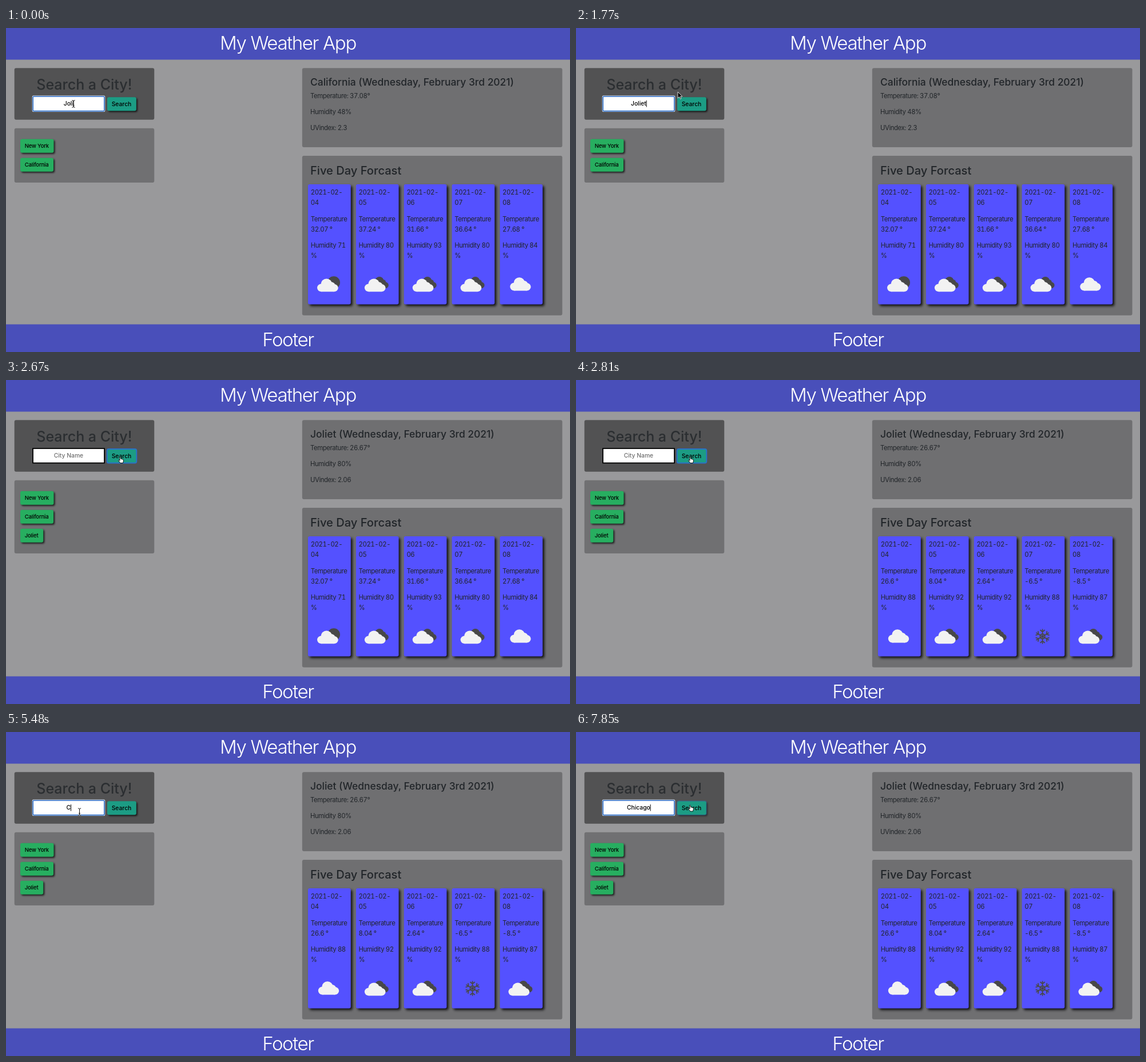
Animation of 986x568 px, one loop 8000 ms. Source, as an HTML page:

```html
<!DOCTYPE html>
<html lang="en">
<head>
<meta charset="utf-8">
<title>My Weather App</title>
<style>
  html, body { margin: 0; width: 100%; height: 100%; overflow: hidden; background: #99999b; }
  svg { display: block; width: 986px; height: 568px; }
  text { font-family: Inter, "Open Sans", sans-serif; font-optical-sizing: none; fill: #212529; white-space: pre; }
  .banner { font-size: 33px; font-weight: 300; letter-spacing: -.041em; fill: #fff; text-anchor: middle; }
  .body { font-size: 11.3px; letter-spacing: -.034em; font-variant-numeric: tabular-nums; }
  .title { font-weight: 500; }
  .field { font-size: 10.3px; font-weight: 500; text-anchor: middle; }
  .city { font-size: 9.5px; font-weight: 500; letter-spacing: -.02em; fill: #000; }
  .lift { filter: drop-shadow(2px 2px 1.5px rgba(0, 0, 0, .75)); }
  .card { fill: #5451ff; filter: drop-shadow(3px 3px 2.2px rgba(0, 0, 0, .85)); }
</style>
</head>
<body>
<svg id="stage" viewBox="0 0 986 568">
  <defs>
    <g id="cloud">
      <circle cx="7.3" cy="16.7" r="7.3"/>
      <circle cx="16" cy="9.5" r="9.5"/>
      <circle cx="24" cy="13" r="7"/>
      <circle cx="29" cy="17" r="7"/>
      <rect x="7" y="12" width="22" height="12"/>
    </g>
    <g id="clear-cloud" fill="#f2f2f2">
      <use href="#cloud" transform="translate(-18.2 -12.2) scale(1.01 .97)"/>
    </g>
    <g id="night-cloud">
      <circle cx="9" cy="-3.2" r="11" fill="#484848"/>
      <use href="#cloud" fill="#f2f2f2" transform="translate(-20 -10) scale(1.02 .95)"/>
    </g>
    <g id="broken-cloud">
      <g fill="#484848">
        <circle cx="5" cy="-5.8" r="7.6"/>
        <circle cx="12" cy="-4" r="4.2"/>
        <circle cx="15.4" cy="1.4" r="5.6"/>
        <rect x="4" y="-3" width="11.4" height="10"/>
      </g>
      <use href="#cloud" fill="#f2f2f2" transform="translate(-21 -10) scale(1.02 .95)"/>
    </g>
    <g id="snow" fill="none" stroke="#484848" stroke-width="1.7" stroke-linecap="round"></g>
    <path id="beam-shape" fill="none"
          d="M-2.6 -6.2Q-.2 -6.2 0 -4.6Q.2 -6.2 2.6 -6.2M0 -5V5M-2.6 6.2Q-.2 6.2 0 4.6Q.2 6.2 2.6 6.2M-1.5 2.5H1.5"/>
    <g id="beam">
      <use href="#beam-shape" stroke="#fff" stroke-width="2" opacity=".5"/>
      <use href="#beam-shape" stroke="#111"/>
    </g>
    <path id="arrow" d="M0 0V11L2.6 8.6L4.3 12.4L6 11.6L4.4 8H7.8Z" fill="#000" stroke="#fff" stroke-width=".8"/>
    <path id="hand" d="M-2.6 -5.2Q-1.8 -6.2 -.9 -5.2L-.2 -2L.9 -2.2L2 -1.6L3 -1.6L4.3 -.6Q4.6 2 3.4 5H-1.2L-4.4 .8Q-4.2 -.6 -2.8 0L-1.9 .9Z"
          fill="#fff" stroke="#000" stroke-width=".9" stroke-linejoin="round"/>
  </defs>

  <rect width="986" height="568" fill="#99999b"/>
  <rect width="986" height="55.5" fill="#494fba"/>
  <rect y="519.5" width="986" height="48.5" fill="#494fba"/>
  <text class="banner" x="493" y="38">My Weather App</text>
  <text class="banner" x="493" y="557.5">Footer</text>

  <rect x="14.7" y="70.3" width="244.5" height="90.5" rx="3" fill="#525253"/>
  <text class="title" x="136.8" y="108.2" font-size="25" text-anchor="middle" style="fill:#2b2e31">Search a City!</text>
  <rect x="47" y="120" width="125" height="25.5" fill="#fff" stroke="#000" stroke-width="1.8"/>
  <g id="focus">
    <rect x="45.8" y="118.5" width="127.4" height="28.5" rx="2" fill="#fff"/>
    <rect x="47.2" y="120" width="124.6" height="25.6" rx="1" fill="#fff" stroke="#2467c4" stroke-width="1.6"/>
  </g>
  <text id="entry" class="field" x="109.4" y="136"></text>
  <rect id="caret" y="127" width="1" height="11.5" fill="#000"/>

  <rect id="searchButton" x="177" y="121.3" width="50.8" height="24" rx="3" fill="#1c9c84"/>
  <rect id="ring" x="176.6" y="121" width="51.6" height="24.6" rx="3" fill="none" stroke="#2a72c8" stroke-width="2"/>
  <text class="field" x="202" y="136.5" style="fill:#000">Search</text>

  <rect id="history" x="14.7" y="175.8" width="244.5" rx="3" fill="#707072"/>
  <g id="cities"></g>

  <rect x="517.8" y="70.3" width="454.7" height="138.7" rx="3" fill="#6f6f71"/>
  <g id="current"></g>
  <rect x="517.8" y="224" width="454.7" height="279.7" rx="3" fill="#6f6f71"/>
  <text class="title" x="532" y="257" font-size="20.1">Five Day Forcast</text>
  <g id="forecast"></g>
  <use id="cursor"/>
</svg>
<script>
const LOOP = 8000;
const $ = id => document.getElementById(id);
const text = (x, y, label, cls, extra = '') => `<text class="${cls}" x="${x}" y="${y}" ${extra}>${label}</text>`;

// Each track holds [start, value]; a value lasts until the next start.
const at = (track, t) => track.findLast(([start]) => start <= t)[1];

const REPORTS = [
  {
    city: 'California', temperature: '37.08', humidity: 48, uv: '2.3',
    days: [['32.07', 71, 'night-cloud'], ['37.24', 80, 'broken-cloud'], ['31.66', 93, 'broken-cloud'],
           ['36.64', 80, 'broken-cloud'], ['27.68', 84, 'clear-cloud']]
  },
  {
    city: 'Joliet', temperature: '26.67', humidity: 80, uv: '2.06',
    days: [['26.6', 88, 'clear-cloud'], ['8.04', 92, 'broken-cloud'], ['2.64', 92, 'broken-cloud'],
           ['-6.5', 88, 'snow'], ['-8.5', 87, 'broken-cloud']]
  }
];
const CITIES = [['New York', 58.5], ['California', 58], ['Joliet', 40.2]];

const ENTRY = [[0, 'Joli'], [150, 'Jolie'], [440, 'Joliet'], [2220, ''], [5480, 'C'], [5780, 'Ch'],
  [6230, 'Chi'], [6380, 'Chic'], [6520, 'Chicag'], [6670, 'Chicago']];
const FOCUS = [[0, true], [2220, false], [3990, true]];
const CARET = [[0, true], [890, false], [1340, true], [1780, false], [3990, true], [4590, false],
  [5040, true], [7120, false], [7560, true]];
const RING = [[0, 0], [2080, .25], [2220, 1], [3990, .4], [4140, 0], [7850, .25]];
const CURSOR = [
  [0, ['beam', 118, 133]], [1190, ['beam', 114.5, 122.5]], [1340, ['beam', 120, 92]], [1490, ['beam', 146, 97]],
  [1630, ['arrow', 178, 112]], [1780, ['hand', 198, 133]], [1930, ['hand', 201, 140.5]],
  [3560, ['hand', 190, 139.5]], [3700, ['beam', 153, 139]], [3850, ['beam', 128.5, 140]],
  [7270, ['beam', 138, 138]], [7410, ['beam', 160, 135]], [7560, ['hand', 188, 133.5]], [7710, ['hand', 201, 134]]
];

function drawCurrent({ city, temperature, humidity, uv }) {
  $('current').innerHTML =
    text(532, 101, `${city} (Wednesday, February 3rd 2021)`, 'title', 'font-size="17.4"') +
    [`Temperature: ${temperature}°`, `Humidity ${humidity}%`, `UVindex: ${uv}`]
      .map((line, i) => text(532, 123.3 + 28 * i, line, 'body')).join('');
}

function drawForecast({ days }) {
  const baselines = [292, 310.3, 338.8, 357, 385, 403.3];
  $('forecast').innerHTML = days.map(([temperature, humidity, icon], i) => {
    const x = 528 + 83.85 * i;
    const lines = ['2021-02-', `0${4 + i}`, 'Temperature', `${temperature} °`, `Humidity ${humidity}`, '%'];
    return `<rect class="card" x="${x}" y="274" width="74.7" height="210.6" rx="3"/>` +
      lines.map((line, n) => text(x + 4.7, baselines[n], line, 'body')).join('') +
      `<use href="#${icon}" x="${x + 36}" y="449.5"/>`;
  }).join('');
}

function drawCities(count) {
  $('history').setAttribute('height', 29 + 33.1 * count);
  $('cities').innerHTML = CITIES.slice(0, count).map(([name, width], i) => {
    const y = 194.8 + 33 * i;
    return `<rect class="lift" x="25" y="${y}" width="${width}" height="24" rx="3" fill="#27ae60"/>` +
      text(32.8, y + 15.4, name, 'city');
  }).join('');
}

$('snow').innerHTML = [0, 60, 120, 180, 240, 300].map(angle =>
  `<path transform="rotate(${angle})" d="M0 0V-12.4M-3.6 -11L0 -7.8L3.6 -11M0 -4.8L4.2 -2.4"/>`).join('');

// Redraws a part only when its value changes.
const shown = {};
function update(key, value, draw) {
  if (shown[key] === value) return;
  shown[key] = value;
  draw(value);
}

function render(t) {
  const entry = at(ENTRY, t);
  update('entry', entry, value => {
    $('entry').textContent = value || 'City Name';
    $('entry').style.fill = value ? '#000' : '#6d6d6d';
  });
  const entryWidth = entry ? $('entry').getComputedTextLength() : 0;
  const focused = at(FOCUS, t);
  $('focus').setAttribute('visibility', focused ? 'visible' : 'hidden');
  $('caret').setAttribute('visibility', focused && at(CARET, t) ? 'visible' : 'hidden');
  $('caret').setAttribute('x', 109.2 + entryWidth / 2);

  const ring = at(RING, t);
  $('ring').setAttribute('opacity', ring);
  $('searchButton').style.filter = `drop-shadow(2px 2px 1.5px rgba(0, 0, 0, ${.75 * (1 - ring)}))`;

  update('current', REPORTS[t < 2670 ? 0 : 1], drawCurrent);
  update('cities', t < 2670 ? 2 : 3, drawCities);
  update('forecast', REPORTS[t < 2810 ? 0 : 1], drawForecast);

  const [shape, x, y] = at(CURSOR, t);
  $('cursor').setAttribute('href', '#' + shape);
  $('cursor').setAttribute('x', x);
  $('cursor').setAttribute('y', y);
}

const begin = performance.now();
function tick() {
  render((performance.now() - begin) % LOOP);
  requestAnimationFrame(tick);
}
tick();
</script>
</body>
</html>
```
